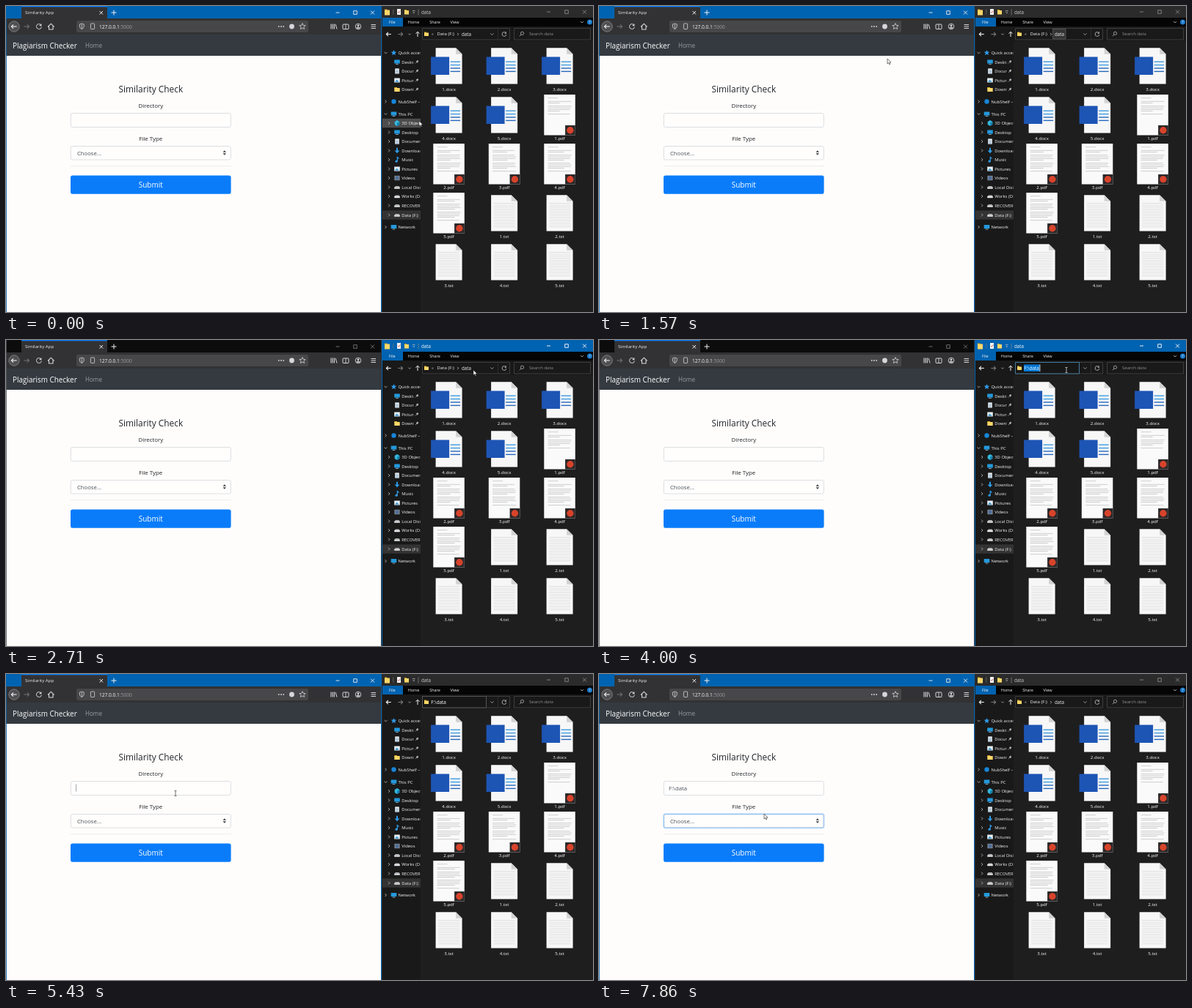
An HTML page with a canvas that plays this animation: 800 by 418 pixels, repeating every 8 s.

```html
<!DOCTYPE html>
<html lang="en">
<head>
<meta charset="utf-8">
<title>Similarity App</title>
<style>
html, body { margin: 0; width: 100%; height: 100%; overflow: hidden; background: #111; }
canvas { display: block; width: 800px; height: 418px; }
</style>
</head>
<body>
<canvas id="stage" width="800" height="418"></canvas>
<script>
const ctx = document.getElementById('stage').getContext('2d');
const LOOP = 8000, FPS = 7;
const ACCENT = '#0063b1', LIGHT = '#f0f0f0', DIM = '#8a8a8c';

// step, x, y of the pointer
const PATH = [
  [0, 563, 157], [4, 587, 130], [8, 627, 40], [11, 393, 72], [16, 600, 50], [19, 637, 41],
  [30, 637, 41], [34, 254, 184], [36, 232, 165], [38, 231, 163], [51, 231, 163], [54, 225, 191], [55, 225, 191]
];

// y, label, icon, indent level, marker
const SIDEBAR = [
  [64, 'Quick access', 'star', 0, 'open'], [76.5, 'Desktop', 'screen', 1, 'pin'],
  [89, 'Documents', 'page', 1, 'pin'], [101.5, 'Pictures', 'photo', 1, 'pin'],
  [114, 'Downloads', 'folder', 1, 'pin'], [130.5, 'NubShelf – Home', 'dot', 0, 'closed'],
  [147.5, 'This PC', 'pc', 0, 'open'], [160, '3D Objects', 'cube', 1, 'closed'],
  [172.5, 'Desktop', 'screen', 1, 'closed'], [185, 'Documents', 'page', 1, 'closed'],
  [197.5, 'Downloads', 'down', 1, 'closed'], [210, 'Music', 'note', 1, 'closed'],
  [222.5, 'Pictures', 'photo', 1, 'closed'], [235, 'Videos', 'film', 1, 'closed'],
  [247.5, 'Local Disk (C:)', 'disk', 1, 'closed'], [260, 'Works (D:)', 'disk', 1, 'closed'],
  [272.5, 'RECOVERY (E:)', 'disk', 1, 'closed'], [285.5, 'Data (F:)', 'disk', 1, 'closed'],
  [302, 'Network', 'pc', 0, 'closed']
];

const FILES = ['docx', 'pdf', 'txt'].flatMap(type => [1, 2, 3, 4, 5].map(n => ({ n, type })));

function rect(x, y, w, h, color) {
  ctx.fillStyle = color;
  ctx.fillRect(x, y, w, h);
}

function box(x, y, w, h, r, fill, stroke, width = 1) {
  ctx.beginPath();
  ctx.roundRect(x, y, w, h, r);
  if (fill) { ctx.fillStyle = fill; ctx.fill(); }
  if (stroke) { ctx.strokeStyle = stroke; ctx.lineWidth = width; ctx.stroke(); }
}

function disc(x, y, r, fill, stroke, width = 1) {
  box(x - r, y - r, 2 * r, 2 * r, r, fill, stroke, width);
}

function trace(points) {
  ctx.beginPath();
  for (let i = 0; i < points.length; i += 2) ctx.lineTo(points[i], points[i + 1]);
}

function line(points, color, width = 1) {
  trace(points);
  ctx.strokeStyle = color;
  ctx.lineWidth = width;
  ctx.stroke();
}

function poly(points, color) {
  trace(points);
  ctx.fillStyle = color;
  ctx.fill();
}

function clipped(x, y, w, h, paint) {
  ctx.save();
  ctx.beginPath();
  ctx.rect(x, y, w, h);
  ctx.clip();
  paint();
  ctx.restore();
}

// y is the visual middle of the line
function text(str, x, y, size, color, align = 'left') {
  ctx.font = `${size}px "Open Sans", "Noto Sans", sans-serif`;
  ctx.textAlign = align;
  ctx.fillStyle = color;
  ctx.fillText(str, x, y + size * 0.36);
}

function chevron(x, y, s, color, down) {
  line(down ? [x - s, y - s / 2, x, y + s / 2, x + s, y - s / 2]
            : [x - s / 2, y - s, x + s / 2, y, x - s / 2, y + s], color, 0.9);
}

function arrow(x, y, s, dir, color) {
  line([x - s, y, x + s, y], color, 1.1);
  const tip = x + dir * s;
  line([tip - dir * 2.6, y - 2.6, tip, y, tip - dir * 2.6, y + 2.6], color, 1.1);
}

function reload(x, y, r, color) {
  ctx.beginPath();
  ctx.arc(x, y, r, 0.2, 5.4);
  ctx.strokeStyle = color;
  ctx.lineWidth = 1;
  ctx.stroke();
  poly([x + r, y - r - 0.6, x + r, y - 0.4, x, y - 1], color);
}

function star(x, y, r, fill, stroke) {
  const pts = [];
  for (let i = 0; i < 10; i++) {
    const a = i * Math.PI / 5 - Math.PI / 2, d = i % 2 ? r * 0.45 : r;
    pts.push(x + d * Math.cos(a), y + d * Math.sin(a));
  }
  if (fill) poly(pts, fill);
  else line([...pts, pts[0], pts[1]], stroke, 0.8);
}

function controls(xs, y, color) {
  const [a, b, c] = xs;
  line([a - 2.5, y, a + 2.5, y], color, 0.9);
  box(b - 2.3, y - 2.3, 4.6, 4.6, 0, null, color, 0.9);
  line([c - 2.5, y - 2.5, c + 2.5, y + 2.5], color, 0.9);
  line([c + 2.5, y - 2.5, c - 2.5, y + 2.5], color, 0.9);
}

function folder(x, y, w, h) {
  rect(x, y, w * 0.5, 2, '#d9a520');
  rect(x, y + 1, w, h - 1, '#ffd768');
}

function browserBars(active) {
  rect(0, 0, 512, 17, active ? ACCENT : '#0c0c0d');
  rect(21, 0, 117, 18, '#323234');
  rect(21, 0, 117, 1.3, '#0a84ff');
  text('Similarity App', 26, 9.3, 6.1, LIGHT);
  line([127.5, 7, 132, 11.5], LIGHT, 1);
  line([132, 7, 127.5, 11.5], LIGHT, 1);
  line([143.5, 9, 150.5, 9], LIGHT, 1);
  line([147, 5.5, 147, 12.5], LIGHT, 1);
  controls([452, 476, 499.5], 9, active ? LIGHT : '#77777a');

  rect(0, 17, 512, 22, '#323234');
  disc(11, 28, 7.2, '#505053', '#8a8a8d', 0.8);
  arrow(11, 28, 3.6, -1, LIGHT);
  arrow(28, 28, 3.5, 1, '#707073');
  reload(45, 28, 3.4, '#d7d7db');
  line([57, 28.5, 61.3, 24.2, 65.6, 28.5], '#d7d7db', 1.1);
  line([58.5, 27.5, 58.5, 32, 64, 32, 64, 27.5], '#d7d7db', 1.1);

  box(96, 20, 316, 16, 2, '#474749');
  line([100.3, 25, 103.3, 24, 106.3, 25, 106, 29, 103.3, 32, 100.6, 29, 100.3, 25], '#c8c8cc', 0.9);
  line([103.3, 25, 103.3, 31], '#c8c8cc', 0.9);
  box(115.4, 24, 5.2, 7.5, 0.8, null, '#c8c8cc', 0.9);
  text('127.0.0.1', 127, 28.3, 6.6, '#f9f9fa');
  const host = ctx.measureText('127.0.0.1').width;
  text(':5000', 127 + host, 28.3, 6.6, '#9c9c9f');
  for (const x of [371.8, 375, 378.2]) disc(x, 28, 0.9, '#d7d7db');
  disc(389.5, 28, 3.4, '#d7d7db');
  star(404, 28, 4.4, null, '#d7d7db');

  for (const x of [443, 445.2, 447.4]) line([x, 24.5, x, 31.5], '#d7d7db', 1.1);
  line([449, 24.8, 451, 31.5], '#d7d7db', 1);
  box(459, 25, 8, 6.5, 1, null, '#d7d7db', 1);
  line([463, 25, 463, 31], '#d7d7db', 0.9);
  disc(480, 28, 3.8, null, '#d7d7db', 0.9);
  disc(480, 27, 1.4, '#d7d7db');
  rect(477.8, 29, 4.4, 1.6, '#d7d7db');
  for (const y of [25.5, 28, 30.5]) line([497.5, y, 504, y], '#d7d7db', 1);
}

function field(y, h, ring) {
  if (ring) box(87.8, y - 0.2, 219, h + 0.4, 2.6, null, `rgba(0,123,255,${0.2 * ring})`, 1.6);
  box(88.3, y + 0.5, 218, h - 1, 2.2, '#fffefd', '#d3d7db', 0.8);
  if (ring) box(88.3, y + 0.5, 218, h - 1, 2.2, null, `rgba(110,180,255,${ring})`, 0.9);
}

function page(k) {
  rect(0, 39, 512, 29, '#343a40');
  text('Plagiarism Checker', 9, 54.3, 9.92, '#fff');
  text('Home', 108, 54.5, 8.1, '#9a9da0');
  rect(0, 68, 512, 350, '#fffdfc');
  const ink = '#212529', mid = 197.3;
  text('Similarity Check', mid, 113.8, 11.9, ink, 'center');
  text('Directory', mid, 135.8, 7.9, ink, 'center');
  text('File Type', mid, 180.7, 7.9, ink, 'center');

  const dirRing = k < 39 ? 0 : k === 39 ? 0.6 : k < 54 ? 1 : k === 54 ? 0.5 : 0;
  field(146, 20, dirRing);
  const pasted = k >= 46;
  if (pasted) text('F:\\data', 95, 156, 7.75, '#495057');
  const caretOn = (k >= 37 && k < 42) || (k >= 46 && k < 49);
  if (caretOn) rect(pasted ? 120 : 95, 150.5, 0.7, 10, '#7d8287');

  const ring = k === 54 ? 0.4 : k > 54 ? 0.8 : 0;
  field(191, 19.5, ring);
  if (ring) {
    ctx.setLineDash([1, 1]);
    box(89.5, 192, 215.5, 17.3, 0, null, `rgba(80,90,100,${0.4 * ring})`, 0.5);
    ctx.setLineDash([]);
  }
  text('Choose...', 97, 201, 7.7, '#495057');
  poly([295.6, 199.8, 300, 199.8, 297.8, 197.3], '#343a40');
  poly([295.6, 201.2, 300, 201.2, 297.8, 203.7], '#343a40');

  rect(88, 218.5, 219, 0.7, '#e4e4e4');
  box(88, 231.5, 218.6, 25.3, 2.8, '#0a7cfa');
  text('Submit', mid, 244.4, 10, '#fff', 'center');
}

function sideIcon(kind, x, y) {
  const blue = '#2f9be8';
  if (kind === 'star') star(x, y, 4, blue);
  else if (kind === 'dot') disc(x, y, 3.2, '#1685d9');
  else if (kind === 'page') {
    rect(x - 2.8, y - 3.6, 5.6, 7.2, '#eef2f5');
    for (const d of [-1.5, 0.2, 1.9]) rect(x - 1.8, y + d, 3.6, 0.7, '#5f8fb8');
  } else if (kind === 'photo') {
    rect(x - 3.8, y - 3, 7.6, 6, '#e8f0f5');
    poly([x - 3, y + 2.2, x - 0.5, y - 1, x + 1, y + 0.6, x + 3, y + 2.2], '#3c98cc');
  } else if (kind === 'folder') folder(x - 3.7, y - 3, 7.4, 6);
  else if (kind === 'cube') {
    poly([x - 3.3, y - 2, x, y - 4, x + 3.3, y - 2, x + 3.3, y + 2, x, y + 4, x - 3.3, y + 2], '#36b7dd');
    poly([x, y, x + 3.3, y - 2, x + 3.3, y + 2, x, y + 4], '#1581ae');
  } else if (kind === 'down') {
    line([x, y - 3.8, x, y + 1], blue, 2);
    poly([x - 3.4, y, x + 3.4, y, x, y + 3.8], blue);
  } else if (kind === 'note') {
    line([x + 0.3, y + 2, x + 0.3, y - 3.5, x + 2.5, y - 1.5], blue, 1.2);
    disc(x - 0.9, y + 2.2, 1.6, blue);
  } else if (kind === 'film') {
    rect(x - 3.6, y - 3.2, 7.2, 6.4, '#7f8794');
    rect(x - 2.2, y - 2.4, 4.4, 4.8, '#4d6f98');
  } else if (kind === 'disk') {
    poly([x - 3.8, y, x - 2, y - 1.6, x + 2.4, y - 1.6, x + 3.8, y], '#b9bcc0');
    rect(x - 3.8, y, 7.6, 2.2, '#e4e6e8');
  } else {
    rect(x - 3.8, y - 3, 7.6, 5, '#2499dc');
    rect(x - 1.8, y + 2.6, 3.6, 0.9, '#9fb6c6');
  }
}

function sideRow([y, label, icon, level, mark], px, py) {
  const over = px >= 513 && px < 565 && Math.abs(py - y) < 6.2;
  if (over) rect(513, y - 6.2, 52, 12.4, '#4d4d4d');
  else if (label === 'Data (F:)') rect(513, y - 6.2, 52, 12.4, '#333');
  sideIcon(icon, 528.5 + 4.5 * level, y);
  const right = mark === 'pin' ? 555.5 : 564.5;
  clipped(513, y - 7, right - 513, 14, () => text(label, 534.5 + 4.7 * level, y, 5.9, '#f4f4f4'));
  if (mark === 'pin') {
    line([558, y + 2, 560, y], '#b0b0b0', 0.7);
    poly([558.7, y - 0.8, 561, y - 2.4, 562.3, y - 1, 560.8, y + 1.2], '#b0b0b0');
  } else chevron(517.5 + 4.5 * level, y, 1.9, '#b5b5b5', mark === 'open');
}

function sidebar(px, py) {
  rect(513, 48, 52, 370, '#191919');
  for (const row of SIDEBAR) sideRow(row, px, py);
}

function sheet(x, y, w, h, fold) {
  poly([x, y, x + w - fold, y, x + w, y + fold, x + w, y + h, x, y + h], '#f8f7f7');
  poly([x + w - fold, y, x + w - fold, y + fold, x + w, y + fold], '#d2d2d4');
}

function pdfIcon(n, x, top) {
  rect(x - 21.3, top + 1, 42.5, 55.5, '#fbfafa');
  const rows = n === 1 ? 11 : 16;
  for (let i = 0; i < rows; i++) {
    if (i === 1 || i % 5 === 4) continue;
    const w = i === 0 ? 14 : i % 5 === 3 ? 14 + n * 2 : 32 - (i * 7 + n) % 3;
    rect(x - 16, top + 5.5 + i * 2.2, w, 0.6, '#b0b0b2');
  }
  rect(x + 7.5, top + 43, 13.7, 13.5, '#2c2829');
  disc(x + 14.3, top + 49.7, 4.7, '#d8432b');
}

function fileIcon(type, n, x, top) {
  if (type === 'pdf') {
    pdfIcon(n, x, top);
    return;
  }
  sheet(x - 18, top + 4.3, 36, 49.2, 8.5);
  if (type === 'docx') {
    for (let i = 0; i < 4; i++) rect(x + 2, top + 22.5 + i * 4.4, 13.5, 1.4, i < 2 ? '#3f9be0' : '#2467bd');
    rect(x - 24.5, top + 16.5, 25, 24.5, '#1d55b5');
  } else {
    for (let i = 0; i < 13; i++) rect(x - 14.5, top + 15 + i * 2.7, 29, 0.7, '#d6d6d8');
  }
}

function files(px, py) {
  rect(565, 48, 235, 370, '#1f1e1f');
  FILES.forEach(({ n, type }, i) => {
    const x = 603.6 + 75.5 * (i % 3), top = 53 + 67 * Math.floor(i / 3);
    if (Math.abs(px - x) < 30 && py > top && py < top + 67) rect(x - 30, top, 60, 66.5, '#474747');
    fileIcon(type, n, x, top);
    text(`${n}.${type}`, x, top + 61.2, 6.1, '#fff', 'center');
  });
}

function addressBar(k) {
  const editing = k >= 20 && k < 40, selected = editing && k < 37;
  box(567.5, 30.5, 119, 15.5, 0, '#191919', '#484848', 0.8);
  folder(570, 35.5, 6, 5.5);
  if (editing) {
    box(567.5, 30.5, 87, 15.5, 0, '#171717', selected ? '#4d87ac' : '#5c5c5c', 0.9);
    folder(570, 35.5, 6, 5.5);
    if (selected) rect(579, 33.5, 21.5, 9.5, '#0078d7');
    text('F:\\data', 579.3, 38.3, 6.4, '#fff');
    if (selected && (k < 23 || (k >= 28 && k < 33))) rect(600.5, 33.5, 0.8, 9.5, '#fff');
  } else {
    if (k >= 8 && k < 17) box(618.5, 31.5, 17.5, 13.5, 0, '#343434', '#5c5c5c', 0.8);
    text('«', 580, 38, 5.5, '#ccc');
    text('Data (F:)', 587.5, 38.3, 6.1, '#f4f4f4');
    chevron(616, 38.5, 1.6, '#bbb');
    text('data', 621, 38.3, 6.2, '#f4f4f4');
  }
  chevron(662.5, 38.5, 2.1, '#aaa', true);
  line([670.5, 31, 670.5, 46], '#363636', 0.7);
  reload(679, 38.5, 2.9, '#a8a8a8');
  box(692.5, 30.5, 104, 15.5, 0, '#191919', '#484848', 0.8);
  disc(703.5, 37.3, 2.1, null, '#aaa', 0.9);
  line([702, 39, 699.8, 41.2], '#aaa', 0.9);
  text('Search data', 713, 38.3, 6, '#929292');
}

function explorer(k, active, px, py) {
  rect(512, 0, 288, 418, '#191919');
  rect(513, 0, 287, 16, active ? ACCENT : '#2b2b2b');
  folder(516, 4.5, 7, 8);
  rect(527.5, 4.5, 0.7, 7, '#777');
  rect(533, 4, 5, 8, '#f4f4f4');
  line([534.2, 8, 535.3, 9.3, 537.2, 6.5], '#c44', 0.8);
  folder(543, 5, 6, 6.5);
  line([554, 6.5, 557.5, 6.5], '#ccc', 0.7);
  chevron(555.7, 9, 1.3, '#ccc', true);
  rect(561.7, 4.5, 0.7, 8, '#888');
  text('data', 566, 8.3, 6.2, active ? '#fff' : '#d0d0d0');
  controls([739.5, 764, 788.5], 8, active ? '#fff' : DIM);

  rect(513, 16, 287, 12, '#050505');
  rect(513, 16, 28, 12, ACCENT);
  for (const [label, x] of [['File', 526.3], ['Home', 555.5], ['Share', 584.5], ['View', 611.5]])
    text(label, x, 22, 5.5, '#f4f4f4', 'center');
  chevron(785, 22, 2, '#aaa', true);
  disc(795.5, 22, 3.5, '#1979ca');
  text('?', 795.5, 22, 5.5, '#fff', 'center');

  arrow(521.5, 38.5, 3.2, -1, '#f0f0f0');
  arrow(537.5, 38.5, 3.2, 1, '#777');
  chevron(550, 38.5, 1.6, '#aaa', true);
  line([561, 42, 561, 35.2], '#eee', 1);
  line([558.5, 37.8, 561, 35.2, 563.5, 37.8], '#eee', 1);
  addressBar(k);
  files(px, py);
  sidebar(px, py);
}

function pointerAt(k) {
  const i = Math.max(1, PATH.findIndex(p => p[0] >= k));
  const [k0, x0, y0] = PATH[i - 1], [k1, x1, y1] = PATH[i];
  const u = (k - k0) / (k1 - k0);
  return [x0 + (x1 - x0) * u, y0 + (y1 - y0) * u];
}

function pointer(k, x, y) {
  const inAddress = k >= 20 && x > 567 && x < 655 && y > 30 && y < 46;
  const inField = x > 88 && x < 307 && y > 146 && y < 166;
  if (inAddress || inField) {
    const color = inAddress ? '#eee' : '#333';
    line([x, y - 3.5, x, y + 3.5], color, 0.7);
    for (const end of [y - 3.5, y + 3.5]) line([x - 1.6, end, x + 1.6, end], color, 0.6);
    return;
  }
  const shape = [0, 0, 0, 7, 1.7, 5.6, 2.7, 7.9, 3.8, 7.4, 2.8, 5.1, 5, 5.1, 0, 0]
    .map((v, i) => v + (i % 2 ? y : x));
  poly(shape, '#fff');
  line(shape, '#222', 0.6);
}

function draw(now) {
  const k = Math.floor((now % LOOP + 6) * FPS / 1000) % (LOOP * FPS / 1000);
  const [x, y] = pointerAt(k);
  const right = k >= 17 && k < 37;
  browserBars(!right);
  page(k);
  explorer(k, right, x, y);
  rect(0, 0, 0.8, 418, right ? '#55585c' : ACCENT);
  rect(511, 0, 1, 418, right ? '#303236' : ACCENT);
  rect(512, 0, 1, 418, right ? ACCENT : '#2b2b2b');
  pointer(k, x, y);
}

let start;
function frame(now) {
  start ??= now;
  draw(Math.max(0, now - start));
  requestAnimationFrame(frame);
}
draw(0);
requestAnimationFrame(frame);
</script>
</body>
</html>
```
